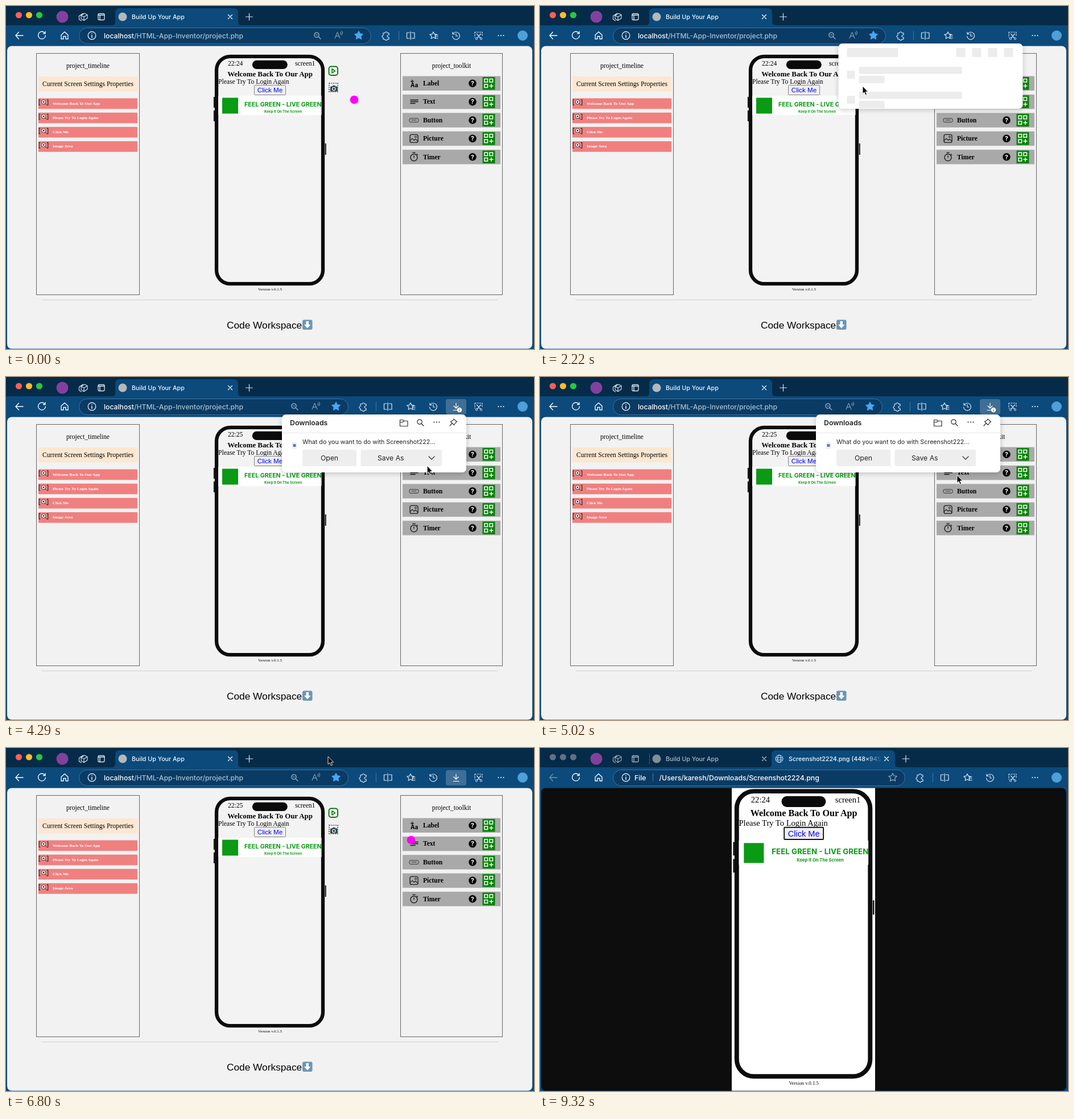
These frames come from a looping animation (928 by 604 pixels, 9.34 s). An HTML page:

```html
<!DOCTYPE html>
<html lang="en">
<head>
<meta charset="utf-8">
<title>Build Up Your App</title>
<style>
html, body { margin: 0; width: 100%; height: 100%; overflow: hidden; background: #0b4a7b; }
svg { display: block; font-family: Inter, "Open Sans", sans-serif; }
.s { font-family: "Liberation Serif", serif; font-size: 11.6px; }
.a { font-family: "Liberation Sans", sans-serif; }
.b { font-weight: 700; }
.m { font-weight: 500; }
.c { text-anchor: middle; }
</style>
</head>
<body>
<svg id="stage" width="928" height="604" viewBox="0 0 928 604"></svg>
<script>
const NAVY = '#052b48', BLUE = '#0b4a7b', PALE = '#dbe6ef', GREEN = '#0a9a14';

// Drawing helpers, each returning markup
const rect = (x, y, w, h, fill, more = '') =>
  `<rect x="${x}" y="${y}" width="${w}" height="${h}" fill="${fill}" ${more}/>`;
const circle = (x, y, r, fill, more = '') =>
  `<circle cx="${x}" cy="${y}" r="${r}" fill="${fill}" ${more}/>`;
const text = (x, y, str, more = '') => `<text x="${x}" y="${y}" ${more}>${str}</text>`;
const line = (d, color = PALE, w = 1.2, more = '') =>
  `<path d="${d}" fill="none" stroke="${color}" stroke-width="${w}" stroke-linecap="round" stroke-linejoin="round" ${more}/>`;
const at = (x, y, body, id = '') => `<g ${id && `id="${id}"`} transform="translate(${x} ${y})">${body}</g>`;
const group = (id, body) => `<g id="${id}">${body}</g>`;
const cross = (x, y) => line(`M${x - 3.5} ${y - 3.5}l7 7m0-7l-7 7`, '#fff');
const plus = x => line(`M${x - 6} 19h12m-6-6v12`);
const dots = (x, y, color) => [-4.5, 0, 4.5].map(d => circle(x + d, y, 1.1, color)).join('');
const lens = color => circle(-1, -1, 4.2, 'none', `stroke="${color}" stroke-width="1.2"`) + line('M2 2l4 4', color);

function star(r) {
  let d = '';
  for (let i = 0; i < 10; i++) {
    const a = i * Math.PI / 5, q = i % 2 ? r * .5 : r;
    d += `${i ? 'L' : 'M'}${(q * Math.sin(a)).toFixed(2)} ${(-q * Math.cos(a)).toFixed(2)}`;
  }
  return d + 'z';
}

function tabBar() {
  const tab = (x, w) => `<path fill="${BLUE}" d="M${x - 6} 34q6 0 6-6V12q0-8 8-8h${w - 16}q8 0 8 8v16q0 6 6 6z"/>`;
  const lights = ['#ff5f57', '#febc2e', '#28c840'];
  return rect(0, 0, 928, 34, NAVY) +
    group('lit', lights.map((c, i) => circle(22.5 + 18 * i, 16, 5.6, c)).join('')) +
    group('unlit', lights.map((c, i) => circle(22.5 + 18 * i, 16, 5.6, '#5d7286')).join('')) +
    circle(99, 19, 10.5, '#84409f') +
    group('windowIcons', line('M128.5 17.5v6l4 2.500M128.5 17.5l7-4.500M132 16.5l6-3.500 5 2.500v6l-6 4-5-3zM132 16.5l5 2.700 6-3.700M137 19.2v6.300', PALE, 1.1) +
      rect(162, 13.5, 11, 11, 'none', `rx="2" stroke="${PALE}" stroke-width="1.3"`) + line('M162 16h11m-8 0v8', PALE, 1.4)) +
    group('pageTab', tab(192, 216) + plus(427.5)) +
    group('imageTab', tab(407, 217) + line('M192.5 10v18', '#3b5a73', 1) + plus(643) + cross(609, 19) +
      circle(420.5, 19, 6.5, 'none', `stroke="${PALE}"`) +
      `<ellipse cx="420.5" cy="19" rx="3" ry="6.5" fill="none" stroke="${PALE}"/>` + line('M414.5 17h12m-12 4h12', PALE, .9) +
      text(437, 22.8, 'Screenshot2224.png (448×945', 'class="m" font-size="10.7" fill="url(#fade)"')) +
    group('pageTitle', circle(205, 19, 7.5, '#b8b8b8') +
      text(221, 22.8, 'Build Up Your App', 'class="m" font-size="10.7" fill="#f4f8fb"') + cross(394, 19));
}

function toolbar() {
  const pageUrl = 'localhost<tspan fill="#a9c0d3">/HTML-App-Inventor/project.php</tspan>';
  return rect(0, 34, 928, 36, BLUE) +
    line('M30 52H17m5.5-6L17 52l5.5 6', '#fff', 1.3, 'id="back"') +
    line('M68.5 48a6.5 6.5 0 1 0 1 4M69 45v3.500h-3.500', '#fff', 1.3) +
    line('M97 51l6-5.500 6 5.500v7h-4v-4.500h-4V58h-4z', '#fff', 1.3) +
    rect(128.5, 38.5, 513, 28, '#0a3b64', 'id="pill" rx="14" stroke="#41719a"') +
    circle(151, 52, 6.8, 'none', 'stroke="#fff" stroke-width="1.2"') + line('M151 51.5v4m0-7v.2', '#fff', 1.4) +
    group('pageUrl', text(172, 56.5, pageUrl, 'class="m" font-size="12.2" fill="#fff"')) +
    group('imageUrl', text(166, 56.5, 'File', 'class="m" font-size="12.2" fill="#fff"') + line('M198.5 45v14', '#41719a') +
      text(209.5, 56.5, '/Users/karesh/Downloads/Screenshot2224.png', 'class="m" font-size="12.3" fill="#fff"')) +
    at(0, 0,
      group('pageTools', at(547, 52, lens('#9ab4c9') + line('M-3-1h4', '#9ab4c9', 1)) +
        line('M578 57l4.500-11 4.500 11m-7.500-4h6M588 46q2 2 0 4m2-6q3 3 0 7', '#9ab4c9', 1) +
        at(620, 52, `<path d="${star(8)}" fill="#48a7f5" stroke="#48a7f5" stroke-linejoin="round"/>`)) +
      at(620, 52, line(star(7.5), '#9ab4c9'), 'emptyStar') +
      at(668, 52, line('M-5-4.500h3a2 2 0 1 1 4 0h3v3.500h-1a2 2 0 1 0 0 4h1v3.500h-3a2 2 0 1 1-4 0h-3v-3a2 2 0 1 1 0-4z')) +
      line('M690.5 44v16', '#41719a') +
      line('M709 47h-4.500v10h4.500m4-10h5v10h-5M711 45v14') +
      at(751, 52, line(star(6.5) + 'M3-1h5M4 2h4M4 5h4')) +
      at(791, 52, line('M-5.5-3a6.5 6.5 0 1 1-1 4M-6-6v3.500h3.500M0-3.500V1h3')), 'tools') +
    at(791, 52, rect(-18, -13, 36, 27, '#3f6f96', 'rx="4"') + line('M0-6V3m-4-4l4 4 4-4M-5 6.5H5', '#fff') +
      group('badge', circle(6, 6, 4.2, '#fff') + line('M6 6v2m0-4v.1', BLUE, 1)), 'download') +
    at(830.5, 52, line('M-6.5-6h13v7M-6.5-6v9', PALE, 1.2, 'stroke-dasharray="2 2.2"') + line('M-3-3l7 8m0-8l-7 8') +
      [-3.5, 4.5].map(x => circle(x, 5.5, 1.7, BLUE, `stroke="${PALE}"`)).join('')) +
    dots(870, 52, '#fff') + circle(908, 52, 9, '#4f9fd8');
}

function phone(id, screen, border, borderWidth) {
  return rect(364.9, 160, 2, 19, '#111') + rect(364.9, 184, 2, 19, '#111') + rect(560.7, 242, 2, 20, '#111') +
    rect(370, 88.8, 187, 400.4, screen, 'rx="24" stroke="#0c0c0c" stroke-width="6.3"') +
    rect(432.8, 95.7, 62, 15.3, '#0a0a0a', 'rx="7.6"') +
    text(390, 105, '22:24', `id="${id}" class="s"`) + text(508, 105, 'screen1', 'class="s"') +
    text(464, 123.7, 'Welcome Back To Our App', 'class="s b c" style="font-size:12.85px"') +
    text(373, 137.2, 'Please Try To Login Again', 'class="s"') +
    rect(436.5, 139.5, 55, 17, '#efefef', `rx="1" stroke="${border}" stroke-width="${borderWidth}"`) +
    text(464, 152.2, 'Click Me', 'class="a c" font-size="11.6" fill="#00f"') +
    rect(373, 158, 181.5, 34, '#fff') + rect(380, 161.5, 28, 28, GREEN) +
    text(419, 177, 'FEEL GREEN - LIVE GREEN', `class="b" font-size="10.65" fill="${GREEN}"`) +
    text(487, 187.7, 'Keep It On The Screen', `class="b c" font-size="6.1" fill="${GREEN}"`) +
    text(464, 501, 'Version v.0.1.5', 'class="s c" style="font-size:7px"');
}

function page() {
  const panel = (x, w) => rect(x, 83.5, w, 425, 'none', 'stroke="#666"');
  const steps = ['Welcome Back To Our App', 'Please Try To Login Again', 'Click Me', 'Image Area'].map((name, i) =>
    at(57, 162.5 + 25.2 * i, rect(0, 0, 174, 18.7, '#f08080') +
      line('M3 2.5H1.200v9.500H3M15 2.5h1.800v9.500H15', '#222', 1.1) + circle(9, 6.5, 3.8, '#eee', 'stroke="#333" stroke-width=".9"') +
      circle(9, 6.5, 1.3, '#222') + line('M12 9.5l2 2', '#222', 1) +
      text(25, 11.3, name, 'class="s b" fill="#fff" style="font-size:7.15px"'))).join('');
  const icons = {
    Label: text(-6, 7, 'Aa', 'class="b" font-size="10"') + line('M-3-6v5m-2.5-2.500h5', '#111', 1.3),
    Text: line('M-6-3H7M-6 0H7M-6 3H2', '#111', 1.5),
    Button: rect(-8, -3, 16, 6.5, 'none', 'rx="2" stroke="#333"') + line('M-4 0H4', '#333'),
    Picture: rect(-7, -7, 14, 14, 'none', 'rx="3" stroke="#222" stroke-width="1.4"') +
      line('M-7 4l4-4 3 3 3-2 4 4', '#222', 1.3) + circle(3, -3, 1.5, 'none', 'stroke="#222"'),
    Timer: circle(0, 1, 6, 'none', 'stroke="#222" stroke-width="1.5"') + line('M-2-7.500h4M0-2v3M5-5l1.500 1.500', '#222', 1.4),
  };
  const tools = Object.keys(icons).map((name, i) =>
    at(697, 123.5 + 32.4 * i, rect(0, 0, 172, 25.5, '#a9a9a9') + at(20, 12.7, icons[name]) +
      text(36, 16.5, name, 'class="s b"') + circle(123, 12.7, 6.8, '#080808') +
      text(123, 16.5, '?', 'class="b c" font-size="10.5" fill="#fff"') + rect(140.5, 1.5, 22, 22.5, '#078307') +
      [[144, 5], [153, 5], [144, 14.5]].map(([x, y]) => rect(x, y, 5.5, 5.5, 'none', 'stroke="#fff" stroke-width="1.5"')).join('') +
      line('M153 17.2h6m-3-3v6', '#fff', 1.5))).join('');
  return rect(2, 70.5, 923, 533, '#f2f2f2', 'rx="8"') + panel(53.5, 181) + panel(693.5, 179) +
    text(144, 109, 'project_timeline', 'class="s c"') + rect(57, 124, 174, 26.5, '#fbe7d2') +
    text(144, 141.3, 'Current Screen Settings Properties', 'class="s c"') + steps +
    text(783, 109, 'project_toolkit', 'class="s c"') + tools + phone('clock', '#f3f3f3', '#858585', 1) +
    rect(567.5, 106.5, 15.5, 15.5, 'none', 'rx="4" stroke="#08780a" stroke-width="1.9"') +
    line('M573 110.7v7.200l5.500-3.600z', '#08780a', 1.5) +
    rect(568, 136, 15, 15, 'none', 'stroke="#29434b" stroke-width="1.7" stroke-dasharray="1.8 1.9"') +
    rect(570, 141.5, 12.5, 9, '#29434b', 'rx="1.5"') + rect(574, 140, 4.5, 3, '#29434b') +
    circle(576.2, 146, 2.7, '#29434b', 'stroke="#f2f2f2" stroke-width="1.2"') +
    line('M63 517.5H864', '#cfcfcf', 1) +
    text(388, 567.5, 'Code Workspace', 'class="a" font-size="17.3"') +
    rect(521, 552.5, 17.5, 17.5, '#6c96b5', 'rx="3"') + '<path fill="#fff" d="M527.5 555h4.500v6h3.500l-5.700 6.500-5.800-6.500h3.500z"/>';
}

const popup = (x, h, body) => `<g transform="translate(${x} 66)">` +
  rect(0, 0, 324, h, '#fff', 'rx="7" style="filter:drop-shadow(0 2px 5px #0003)"') + body + '</g>';

function skeleton() {
  const bar = (x, y, w, h) => rect(x, y, w, h, '#ececec', 'rx="2"');
  const row = y => bar(15, y + 7, 14, 14) + bar(36, y, 181, 12.5) + bar(36, y + 16, 45, 13);
  return popup(524.5, 115, bar(15, 8, 90, 16) + [207, 235, 263, 291].map(x => bar(x, 8, 16, 16)).join('') + row(41) + row(85));
}

function downloads() {
  const ink = '#333';
  return popup(485, 102, text(14, 18.6, 'Downloads', 'font-size="12.3" font-weight="600" fill="#222"') +
    line('M0 32.5H324', '#e6e6e6', 1) +
    line('M207.5 9.5h5l2 2h6.500v9h-13.500zM207.5 13.5h5l2-2', ink) + at(243, 14, lens(ink)) + dots(272, 13.5, ink) +
    line('M302 8l5.500 5-2 1-3 4.500-6-6 4-2zM299 15.5l-4 4.500', ink) +
    rect(18, 48, 8, 13, '#f0f2f5') + rect(19.5, 52, 5, 5, '#557fc0') +
    text(36, 52, 'What do you want to do with Screenshot222...', 'font-size="10.7" fill="#222"') +
    rect(36, 62, 95, 29, '#eee', 'rx="2"') + text(83.5, 81, 'Open', 'class="c" font-size="12.2" fill="#222"') +
    rect(138.5, 62, 142.5, 29, '#eee', 'rx="2"') + text(168, 81, 'Save As', 'font-size="12.2" fill="#222"') +
    line('M258 74l5 5 5-5', ink));
}

const viewer = rect(2, 70.5, 923, 533, '#0d0d0d', 'rx="8"') + rect(337, 70.5, 252, 533, '#fff') +
  `<g transform="translate(-118.2 -35.2) scale(1.254)">${phone('shotClock', '#fff', '#111', 1.5)}</g>`;

stage.innerHTML =
  '<defs><linearGradient id="fade" gradientUnits="userSpaceOnUse" x1="572" x2="602" y1="0" y2="0">' +
  '<stop stop-color="#f4f8fb"/><stop offset="1" stop-color="#f4f8fb" stop-opacity="0"/></linearGradient></defs>' +
  tabBar() + toolbar() + group('page', page()) + group('viewer', viewer) +
  group('skeleton', skeleton()) + group('downloads', downloads()) +
  at(0, 0, circle(0, 0, 7.3, '#f0f'), 'dot') +
  at(0, 0, '<path d="M0 0v13.500l3-2.700 2.200 5 2.300-1-2.200-4.800h4.200z" fill="#000" stroke="#fff" stroke-width=".9"/>', 'arrow');

const LOOP = 9340, STEP = 147;
// Pointer legs: start time, number of steps, destination
const legs = [
  [150, 2, 612, 131], [590, 4, 565, 154], [1180, 2, 567, 141], [2370, 6, 735, 142], [3260, 2, 746, 143],
  [3850, 9, 733, 173], [5320, 3, 712, 162], [6200, 4, 566, 15],
  [7090, 2, 611, 46], [7390, 2, 659, 88], [7830, 2, 862, 250],
];

function pointer(t) {
  let x = 612, y = 165;
  for (const [start, n, toX, toY] of legs) {
    if (t < start) break;
    const k = Math.min(n, Math.floor((t - start + 8) / STEP) + 1) / n;
    x += (toX - x) * k;
    y += (toY - y) * k;
  }
  return [x, y];
}

const $ = id => document.getElementById(id);
const show = (id, on) => $(id).style.display = on ? '' : 'none';
const fade = (id, opacity) => $(id).setAttribute('opacity', opacity);
const move = (id, x, y) => $(id).setAttribute('transform', `translate(${x} ${y})`);

function draw(t) {
  const within = (from, to) => t >= from && t < to;
  const image = t >= 6950, blurred = t >= 9320;
  const menu = within(2370, 5320), loading = within(2220, 2370);
  const shift = t < 2080 || blurred ? 0 : t < 2220 ? 20 : t < 2370 ? 34 : image ? 1 : 40;
  const [x, y] = pointer(t);

  for (const id of ['page', 'pageTab', 'pageUrl', 'pageTools']) show(id, !image);
  for (const id of ['viewer', 'imageTab', 'imageUrl', 'emptyStar']) show(id, image);
  show('lit', !blurred);
  show('unlit', blurred);
  show('download', within(2370, 6950));
  show('badge', menu);
  show('skeleton', loading);
  show('downloads', menu);
  fade('back', image ? .4 : 1);
  for (const id of ['windowIcons', 'pageTitle']) fade(id, blurred ? .7 : 1);
  $('pill').setAttribute('width', 513 - shift);
  move('tools', -shift, 0);
  $('clock').textContent = t < 3260 ? '22:24' : '22:25';

  show('dot', t < 2220 || within(5320, 6950));
  move('dot', ...(t < 6200 ? [x, y] : [712, 162]));
  show('arrow', !blurred && (loading || menu || image || y < 70));
  move('arrow', x, y);
}

function tick() {
  draw(performance.now() % LOOP);
  requestAnimationFrame(tick);
}
tick();
</script>
</body>
</html>
```
